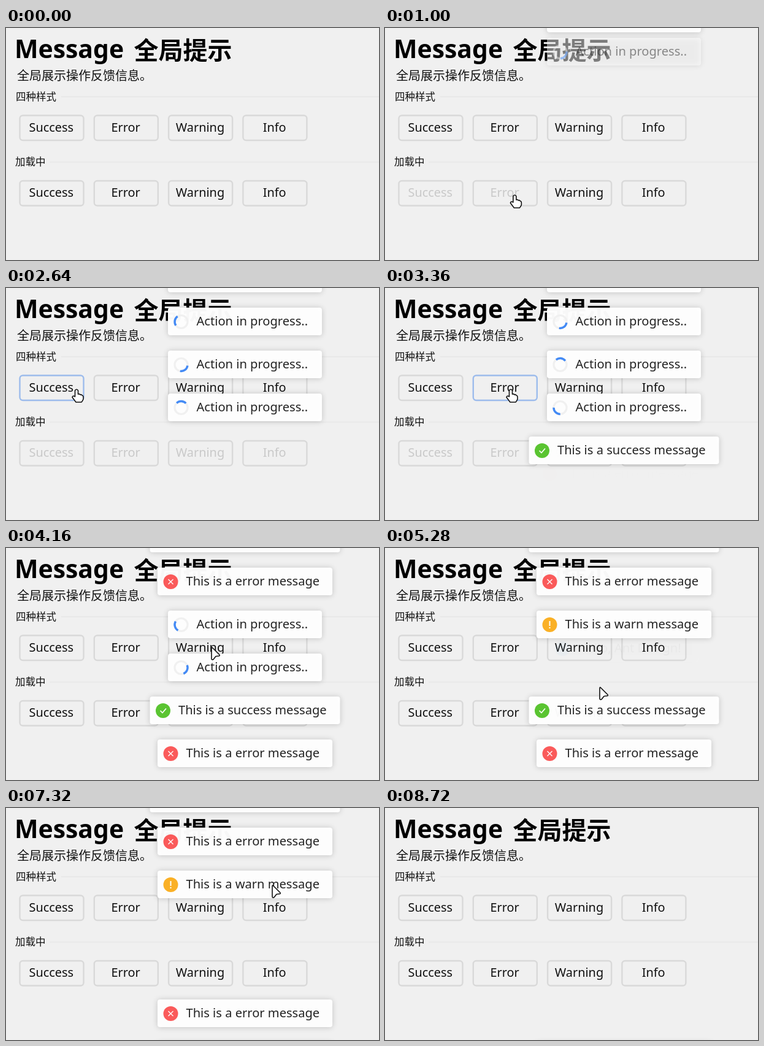
An HTML page with a canvas that plays this animation: 608 by 378 pixels, repeating every 8.8 s.

```html
<!DOCTYPE html>
<html lang="zh">
<head>
<meta charset="utf-8">
<title>Message</title>
<style>
html, body { margin: 0; width: 100%; height: 100%; overflow: hidden; background: #f0f0f0; }
canvas { display: block; width: 608px; height: 378px; }
</style>
</head>
<body>
<canvas id="stage" width="608" height="378"></canvas>
<script>
const ctx = document.getElementById('stage').getContext('2d');
const LOOP = 8800, FADE = 400, LEAVE = 280, SLIDE = 32;
const CENTER = 389.5, TOAST_H = 45;
const LATIN = '"Noto Sans", "Open Sans", sans-serif';
const HAN = '"Noto Sans CJK SC", "Noto Sans CJK", sans-serif';

const KINDS = {
  loading: { text: 'Action in progress..', width: 251 },
  success: { text: 'This is a success message', width: 310, color: '#55c22a' },
  error: { text: 'This is a error message', width: 285, color: '#fa5555' },
  warning: { text: 'This is a warn message', width: 285, color: '#faad1e' },
  info: { text: 'Hello, Ant Design!', width: 243, color: '#1890ff' },
};

// A loading toast turns into its result at "done".
const TOASTS = [
  { kind: 'success', y: -38, start: 440, done: 3520, end: 8400, phase: 0 },
  { kind: 'error', y: 32, start: 800, done: 3920, end: 8200, phase: 182 },
  { kind: 'warning', y: 102, start: 1390, done: 4480, end: 7720, phase: 45 },
  { kind: 'info', y: 172, start: 1920, done: 4880, end: 5010, phase: 263 },
  { kind: 'success', y: 242, start: 2840, end: 5400 },
  { kind: 'error', y: 312, start: 3360, end: 8400 },
  { kind: 'warning', y: 382, start: 5920, end: LOOP },
];

const BUTTONS = ['Success', 'Error', 'Warning', 'Info'];
const ROWS = [142.5, 249];

// time, x, y, pointing hand
const CURSOR = [
  [160, 60, 284, 0], [320, 86, 272, 1], [520, 86, 272, 1], [760, 205, 272, 1],
  [960, 205, 272, 1], [1240, 315, 272, 1], [1400, 315, 272, 1], [1640, 430, 272, 1],
  [2000, 430, 272, 0], [2560, 115, 165, 1], [2880, 115, 165, 1], [3200, 205, 165, 1],
  [3600, 205, 165, 0], [4080, 335, 162, 0], [4560, 335, 162, 0], [5120, 350, 227, 0],
  [5440, 350, 227, 0], [5760, 316, 162, 1], [6760, 316, 162, 1], [6960, 435, 160, 1],
  [7120, 435, 160, 0], [7320, 434, 126, 0], [7560, 434, 126, 0], [8320, 556, 280, 0],
];

const clamp = v => Math.max(0, Math.min(1, v));

function label(text, x, y, size, color = '#111', family = LATIN, weight = 400, align = 'left') {
  ctx.font = `${weight} ${size}px ${family}`;
  ctx.textAlign = align;
  ctx.fillStyle = color;
  ctx.fillText(text, x, y);
}

function roundRect(x, y, w, h, r) {
  ctx.beginPath();
  ctx.roundRect(x, y, w, h, r);
}

function line(points, color, width) {
  ctx.beginPath();
  points.forEach(([x, y]) => ctx.lineTo(x, y));
  ctx.strokeStyle = color;
  ctx.lineWidth = width;
  ctx.stroke();
}

function ring(x, y, r, from, to, color, width) {
  ctx.beginPath();
  ctx.arc(x, y, r, from, to);
  ctx.strokeStyle = color;
  ctx.lineWidth = width;
  ctx.stroke();
}

function cursorAt(t) {
  const i = CURSOR.findIndex(key => key[0] > t);
  if (i < 1) return null;
  const [t0, x0, y0, hand] = CURSOR[i - 1], [t1, x1, y1] = CURSOR[i];
  const u = (t - t0) / (t1 - t0), ease = u * u * (3 - 2 * u);
  return { x: x0 + (x1 - x0) * ease, y: y0 + (y1 - y0) * ease, hand };
}

function drawPage() {
  ctx.fillStyle = '#f0f0f0';
  ctx.fillRect(0, 0, 608, 378);
  label('Message', 14, 48.5, 40.9, '#000', LATIN, 700);
  label('全局提示', 208.5, 50.5, 40, '#000', HAN, 700);
  label('全局展示操作反馈信息。', 18, 85, 20, '#111', HAN);
  label('四种样式', 16, 117.5, 16.5, '#111', HAN);
  label('加载中', 15, 224, 16.5, '#111', HAN);
  line([[90, 112], [608, 112]], '#e9e9e9', 2);
  line([[71, 218.5], [608, 218.5]], '#e9e9e9', 2);
}

function drawButtons(t, cursor) {
  ROWS.forEach((y, row) => BUTTONS.forEach((text, i) => {
    const x = 22.5 + i * 121.3;
    const toast = TOASTS[i];
    const disabled = row === 1 && t >= toast.start && t < toast.done;
    const hover = cursor && cursor.hand && !disabled &&
      Math.abs(cursor.x - x - 52) < 53 && Math.abs(cursor.y - y - 20) < 21;
    roundRect(x, y, 104, 40.5, 5);
    ctx.strokeStyle = hover ? '#9dbcec' : '#d9d9d9';
    ctx.lineWidth = 2.4;
    ctx.stroke();
    label(text, x + 51.3, y + 26, 19.9, disabled ? '#c9c9c9' : '#111', LATIN, 400, 'center');
  }));
}

function drawIcon(kind, x, y, angle) {
  if (kind === 'loading') {
    const mid = (angle - 90) * Math.PI / 180;
    ring(x, y, 10.5, 0, 2 * Math.PI, '#f0f0f0', 3.2);
    ring(x, y, 10.5, mid - 0.8, mid + 0.8, '#3d86f5', 3.4);
    return;
  }
  ctx.beginPath();
  ctx.arc(x, y, 12, 0, 2 * Math.PI);
  ctx.fillStyle = KINDS[kind].color;
  ctx.fill();
  if (kind === 'success') {
    line([[x - 4.5, y], [x - 1, y + 3.5], [x + 5, y - 3.5]], '#fff', 1.7);
  } else if (kind === 'error') {
    line([[x - 4, y - 4], [x + 4, y + 4]], '#fff', 1.5);
    line([[x + 4, y - 4], [x - 4, y + 4]], '#fff', 1.5);
  } else {
    const flip = kind === 'info' ? -1 : 1;
    line([[x, y - 6 * flip], [x, y + 2 * flip]], '#fff', 2);
    line([[x, y + 4 * flip], [x, y + 6 * flip]], '#fff', 2);
  }
}

function drawToast(toast, t) {
  const shown = clamp((t - toast.start) / FADE) * (1 - clamp((t - toast.end) / LEAVE));
  if (!shown) return;
  const kind = t < toast.done ? 'loading' : toast.kind;
  const { text, width } = KINDS[kind];
  const x = CENTER - width / 2, y = toast.y - SLIDE * (1 - shown);
  ctx.save();
  ctx.globalAlpha = shown * 0.97;
  ctx.shadowColor = 'rgba(0,0,0,0.2)';
  ctx.shadowBlur = 10;
  ctx.shadowOffsetY = 0.5;
  ctx.fillStyle = '#fff';
  roundRect(x, y, width, TOAST_H, 4);
  ctx.fill();
  ctx.shadowColor = 'transparent';
  drawIcon(kind, x + 21.5, y + 23, toast.phase + t * 0.31);
  label(text, x + 46.5, y + 29, 20.1, '#1c1c1c');
  ctx.restore();
}

function drawCursor({ x, y, hand }) {
  ctx.save();
  ctx.translate(x, y);
  ctx.lineJoin = 'round';
  const shape = hand
    ? 'M-2.5 2Q0 -1.5 2.5 2V8Q5 7 6 9Q8 8 9 10Q11 10 11 13V16Q10 19 8 21H-1Q-4 17 -7 13Q-6 9.5 -2.5 12Z'
    : 'M0 1.5Q0 -1 2 1L13 12Q14 14 11.5 14L7 14.5L3 19.5Q0 21 0 18Z';
  const path = new Path2D(shape);
  ctx.fillStyle = '#fff';
  ctx.fill(path);
  ctx.strokeStyle = '#111';
  ctx.lineWidth = 1.6;
  ctx.stroke(path);
  ctx.restore();
}

function frame() {
  const t = performance.now() % LOOP;
  const cursor = cursorAt(t);
  drawPage();
  drawButtons(t, cursor);
  TOASTS.forEach(toast => drawToast(toast, t));
  if (cursor) drawCursor(cursor);
  requestAnimationFrame(frame);
}
frame();
</script>
</body>
</html>
```
